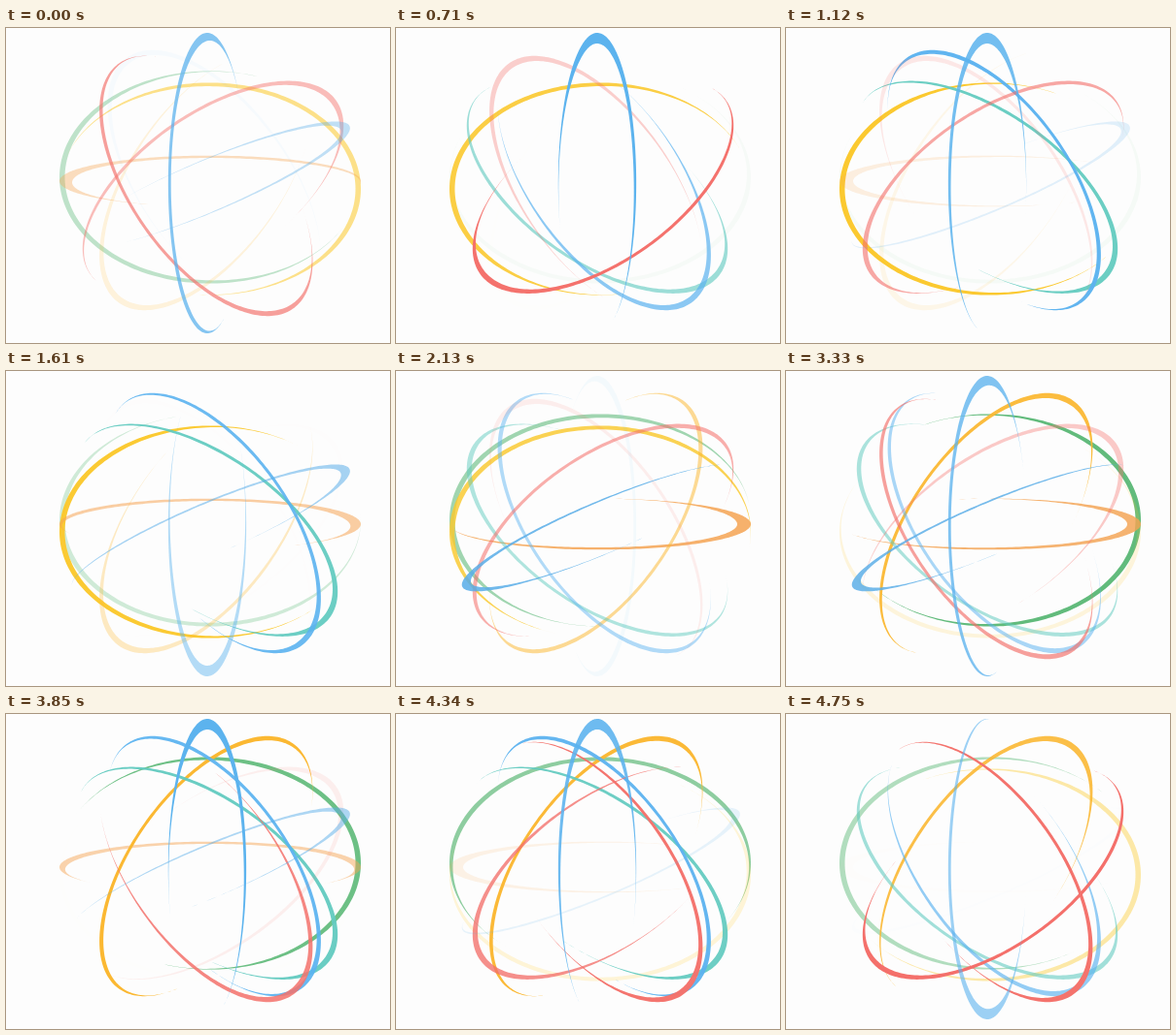
Animation of 395 by 325 pixels, one loop 4.77 s. Source, as an HTML page with a canvas:

```html
<!DOCTYPE html>
<html lang="en">
<head>
<meta charset="utf-8">
<title>Orbiting rings</title>
<style>
  html, body { margin: 0; width: 100%; height: 100%; overflow: hidden; background: #fdfdfd; }
  canvas { display: block; width: 395px; height: 325px; }
</style>
</head>
<body>
<canvas id="stage"></canvas>
<script>
const LOOP = 4770, STEP = 101.3, RADIUS = 155, DEPTH = 2000, RAD = Math.PI / 180;

// axis: screen angle of the long axis; ratio: short / long axis; side: which way perspective shifts it
// from, to: arc angle when faint and when full; low: a time at which it is faintest; half: ms from faint to full
const keys = ['color', 'axis', 'ratio', 'side', 'width', 'from', 'to', 'low', 'half'];
const rings = [
  ['#62bb7c', 0, 0.707, -1, 5.5, -290, 10, 900, 2450],
  ['#fbc92e', 0, 0.707, 1, 5.5, 105, -195, 3820, 2500],
  ['#f5a454', 0, 0.17, -1, 14, 157, 457, 700, 2000],
  ['#fbb832', -54.7, 0.5, -1, 6, 215, -88, 650, 3300],
  ['#62cbc0', 35.3, 0.5, 1, 6, 225, -75, 0, 1360],
  ['#5cb3f0', 54.7, 0.5, -1, 6, 200, -100, -110, 1410],
  ['#f4736d', 54.7, 0.5, 1, 6, 255, -50, 1680, 3000],
  ['#f4706b', -35.3, 0.5, 1, 6, 410, 110, 1640, 1030],
  ['#5aaee8', -23, 0.174, 1, 10, 445, 150, 700, 2000],
  ['#5cb3ee', 90, 0.259, 1, 11, -100, 205, 2290, 1650]
].map(row => Object.fromEntries(row.map((v, i) => [keys[i], v])));

const canvas = document.getElementById('stage');
const ctx = canvas.getContext('2d');
const scale = window.devicePixelRatio || 1;
canvas.width = 395 * scale;
canvas.height = 325 * scale;

// Full width in the middle quarter, tapering to nothing 135 degrees away
const taper = deg => Math.cos(Math.max(0, Math.abs(deg) - 45) * RAD) ** 2;

function drawRing(ring, time) {
  const p = (1 - Math.cos(Math.PI * (time - ring.low) / ring.half)) / 2;
  const middle = ring.from + (ring.to - ring.from) * p;
  const shift = ring.side * RADIUS ** 2 / DEPTH * ring.ratio * Math.sqrt(1 - ring.ratio ** 2);
  const point = (deg, r) => {
    const a = (middle + deg) * RAD;
    ctx.lineTo(r * Math.cos(a), shift + r * ring.ratio * Math.sin(a));
  };

  ctx.save();
  ctx.translate(210, 160);
  ctx.rotate(ring.axis * RAD);
  ctx.globalAlpha = p ** 0.75;
  ctx.fillStyle = ring.color;
  ctx.beginPath();
  for (let d = -135; d <= 135; d += 1.5) point(d, RADIUS);
  for (let d = 135; d >= -135; d -= 1.5) point(d, RADIUS - ring.width * taper(d));
  ctx.fill();
  ctx.restore();
}

function draw(now) {
  // The picture advances about ten times a second
  const time = Math.floor((now % LOOP + 20) / STEP) * STEP;
  ctx.setTransform(scale, 0, 0, scale, 0, 0);
  ctx.fillStyle = '#fdfdfd';
  ctx.fillRect(0, 0, 395, 325);
  rings.forEach(ring => drawRing(ring, time));
}

const start = performance.now();
function tick() {
  draw(performance.now() - start);
  requestAnimationFrame(tick);
}
tick();
</script>
</body>
</html>
```
